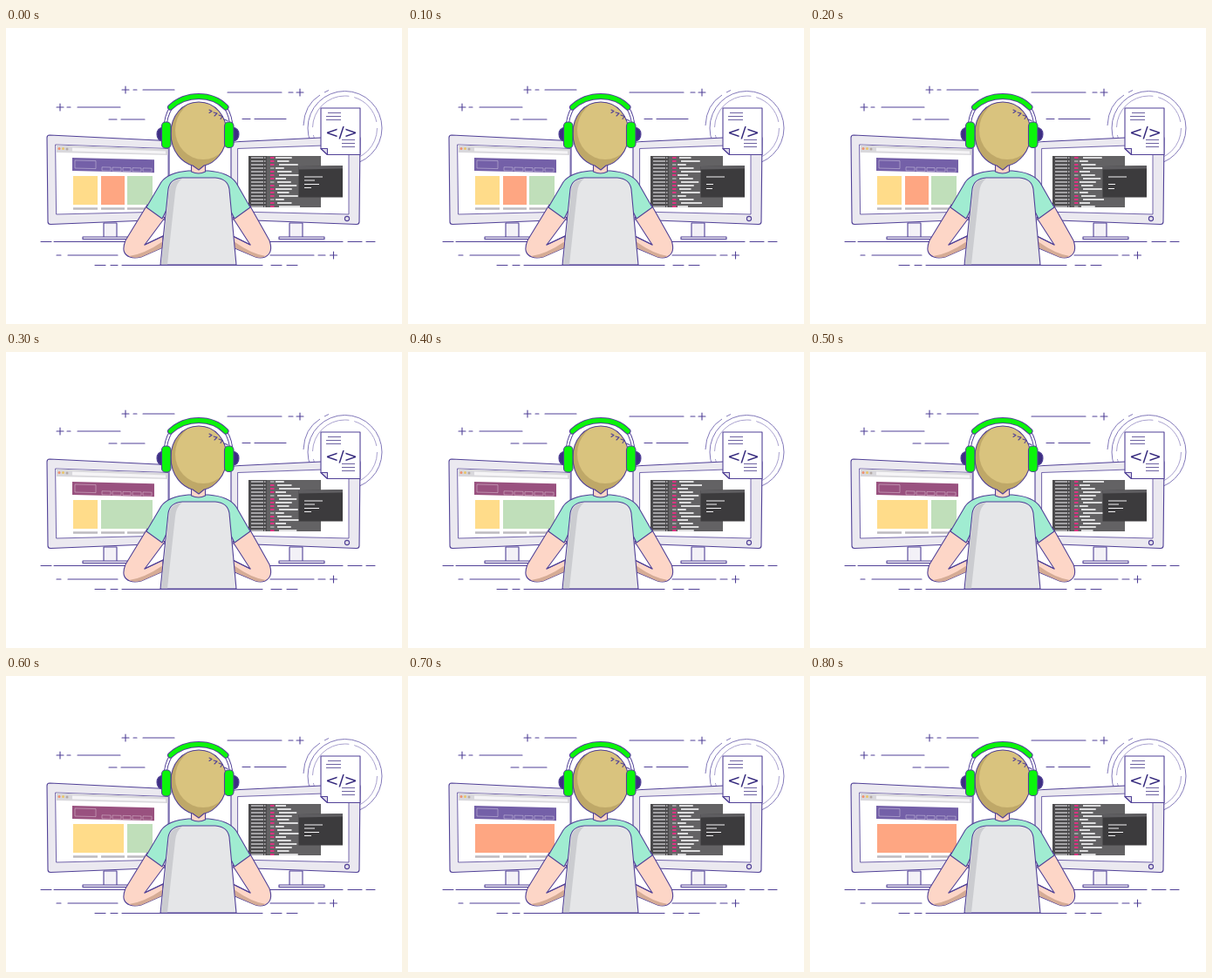
Write an HTML page that moves like this. It is 454 px wide and 340 px high and loops after 900 ms.

```html
<!DOCTYPE html>
<html lang="en">
<head>
<meta charset="utf-8">
<title>Developer at work</title>
<style>
html, body { margin: 0; width: 100%; height: 100%; overflow: hidden; background: #fff; }
svg { display: block; width: 100vw; height: 100vh; }
.ink { stroke: #514197; stroke-width: 1.1; stroke-linejoin: round; stroke-linecap: round; }
.line { fill: none; }
.bar { fill: #7460a8; animation: bar 900ms step-end infinite; }
.card { animation: 900ms step-end infinite; }
.yellow { fill: #ffdc8a; animation-name: yellow; }
.orange { fill: #fea682; animation-name: orange; }
.green { fill: #c0dfba; animation-name: green; }
.scroll { animation: scroll 900ms steps(9) infinite; }
.log { animation: log 900ms step-end infinite; }
.fresh { animation-name: fresh; }
@keyframes bar { 33.333% { fill: #99517f; } 77.778% { fill: #7460a8; } }
@keyframes yellow {
  0%, 33.333% { x: 77px; width: 28px; opacity: 1; }
  55.556% { width: 58px; opacity: 1; }
  77.778%, 100% { opacity: 0; }
}
@keyframes orange {
  0% { x: 109px; width: 27px; opacity: 1; }
  33.333% { opacity: 0; }
  77.778%, 100% { x: 77px; width: 91px; opacity: 1; }
}
@keyframes green {
  0% { x: 139px; width: 29px; opacity: 1; }
  33.333% { x: 109px; width: 59px; opacity: 1; }
  55.556% { x: 139px; width: 29px; opacity: 1; }
  77.778%, 100% { opacity: 0; }
}
@keyframes scroll { to { transform: translateY(-36px); } }
@keyframes log { 0%, 33.333%, 100% { opacity: 1; } 11.111% { opacity: 0; } }
@keyframes fresh { 0%, 33.333%, 100% { opacity: 0; } 11.111% { opacity: 1; } }
</style>
</head>
<body>
<svg viewBox="0 0 454 340" preserveAspectRatio="none">
  <defs>
    <clipPath id="editor"><path d="M278 147H361V206H278Z"/></clipPath>
    <path id="hair" d="M221 85C240 85 253 101 253 121C253 143 238 156 227 158L221 163L214 158C203 155 189 143 189 121C189 101 202 85 221 85Z"/>
    <clipPath id="head"><use href="#hair"/></clipPath>
    <path id="arc" d="M188.500 91Q202 78.500 221 78.500Q240 78.500 252 91"/>
    <path id="hoop" d="M183 109Q185 95 193 87M258 109Q256 95 248 87"/>
  </defs>
  <rect width="454" height="340" fill="#fff"/>

  <!-- background strokes -->
  <path class="ink line" d="M133 71h8M137 67v8M146 71h4M157 71h36
    M58 91h8M62 87v8M70 91h4M82 91h49M118 105h9M132 105h27
    M254 74h62M324 74h5M333 74h8M337 70v8M271 104.500h9M285 104.500h36
    M40 245.500h12M55 245.500h97M296 245.500h90M392 245.500h16M413 245.500h10
    M58 261h5M71 261h57M303 261h50M358 261h8M371.500 261h8M375.500 257v8
    M102 272.500h12M120 272.500h8M133 272.500h161M304 272.500h12M322 272.500h12"/>

  <!-- badge rings -->
  <g fill="none" stroke="#8379ba">
    <circle cx="388.500" cy="115" r="42.500"/>
    <circle cx="388.500" cy="115" r="37" stroke="#aaa2cf" stroke-dasharray="62 6 40 9"/>
    <path d="M341 112Q342 88 360 77M365 74L370 71.500"/>
  </g>

  <!-- left monitor -->
  <g class="ink">
    <path fill="#f3f1f7" d="M112 224h15v17h-15Z"/>
    <path fill="#f1eff4" d="M88 240h52v2.500H88Z"/>
    <path fill="#ebe9f0" d="M50 123L184 129.500Q187 130 187 133V220L51 225.500Q48 225.500 48 222.500L47 126Q47 123 50 123Z"/>
    <path fill="#fff" stroke-width=".8" d="M57 134L186 138.500V211L58 214Z"/>
  </g>
  <path fill="#d9d8dc" d="M58 134.500L185.500 139V146L58 143Z"/>
  <path fill="#f5f4f6" d="M76 137.500L183 141.500V144.500L76 141.500Z"/>
  <g fill="#ee9070"><circle cx="61" cy="138.500" r="1.500"/><circle cx="65.500" cy="138.500" r="1.500" fill="#e9c568"/><circle cx="70" cy="139" r="1.500" fill="#b4aaa8"/></g>
  <g transform="translate(0 -1.900) skewY(1.400)">
    <rect class="bar" x="76" y="149" width="94" height="15"/>
    <path fill="none" stroke="#fff" stroke-opacity=".42" stroke-width=".8" d="M79 152h24v9H79ZM110 159h10v4h-10ZM122 159h10v4h-10ZM134 159h9v4h-9ZM145 159h10v4h-10ZM157 159h10v4h-10Z"/>
  </g>
  <rect class="card yellow" x="77" y="170" width="28" height="33"/>
  <rect class="card orange" x="109" y="170" width="27" height="33"/>
  <rect class="card green" x="139" y="170" width="29" height="33"/>
  <path stroke="#bdbbc0" stroke-width="2.500" d="M77 207.500h28M109 207.500h27M139 207.500h27"/>

  <!-- right monitor -->
  <g class="ink">
    <path fill="#f3f1f7" d="M325 224h15v17h-15Z"/>
    <path fill="#f1eff4" d="M313 240h52v2.500h-52Z"/>
    <path fill="#ebe9f0" d="M268 130.500L403 124Q406 124 406 127L405 222.500Q405 225.500 402 225.500L258 220V133Q258 131 268 130.500Z"/>
    <path fill="#fff" stroke-width=".8" d="M266 138.500L393 134V214L266 211Z"/>
    <circle cx="391" cy="219" r="2.600" fill="#e4e1ea"/>
  </g>
  <path fill="#636264" d="M278 147h83v59h-83Z"/>
  <path fill="#4b4a4c" d="M278 147h21v59h-21Z"/>
  <g clip-path="url(#editor)"><g id="code" class="scroll"></g></g>
  <path fill="#3c3b3d" d="M335.500 159L386 158V194.500H335.500Z"/>
  <path fill="#5e5d60" d="M335.500 159L386 158V161.500L335.500 162.500Z"/>
  <g fill="none" stroke="#f4f3f5" stroke-width="1.200">
    <path class="log" d="M342 171h21M342 175h12M342 179.500h17M342 183.500h8"/>
    <path class="log fresh" d="M342 171h21M342 179.500h8M342 184.500h7"/>
  </g>

  <!-- document -->
  <g class="ink">
    <path fill="#fff" d="M361 92H406V145.500H368.500L361 138.500Z"/>
    <path fill="#e2deed" d="M361 138.500H368.500V145.500Z"/>
  </g>
  <path stroke="#6e63a2" d="M369 97.500h15M367 101.500h17M367 105.500h17M385 128.500h15M385 132.500h15M385 136.500h15"/>
  <text x="384.500" y="125.500" text-anchor="middle" font-size="18.500" font-family="DejaVu Sans, sans-serif" fill="#33277c">&lt;/&gt;</text>

  <!-- person -->
  <g class="ink">
    <path fill="#fdd6c7" d="M162 203L137 244Q131 259 142 263Q147 265 155 263L180 252V239L159 249L182 218Z"/>
    <path fill="#fdd6c7" d="M279 203L302 244Q307 258 297 263Q292 265 286 263L260 252V239L280 249L260 218Z"/>
    <path fill="#d5ab95" stroke="none" d="M141 262Q158 260 180 245V252L155 263Q147 265 141 262ZM298 262Q282 260 261 245V252L286 263Q292 265 298 262Z"/>
    <path class="line" d="M180 239L159 249M260 239L280 249"/>
    <path fill="#a0ecd1" d="M209 164Q186 166 178 177L161 206L179 219L188 201H253L262 219L280 206L264 178Q256 166 232 164Z"/>
    <path fill="#fdd6c7" d="M212.500 150V165Q221 169 228.500 165V150Z"/>
    <path fill="#e5e6e8" d="M177 272L186 185Q188 173 202 172H240Q254 173 256 185L264 272Z"/>
    <path fill="#cbccd0" stroke="none" d="M178 271.500L187 186Q189 174 202 173Q195 178 194 189L185 271.500Z"/>
  </g>
  <g clip-path="url(#head)">
    <path fill="#bfa868" d="M185 80H257V166H185Z"/>
    <ellipse cx="226" cy="117" rx="32" ry="34" fill="#d9c37e"/>
  </g>
  <use href="#hair" class="ink line"/>
  <path class="line ink" stroke-width=".8" d="M233 94l3 1.500l-3 2M238 97l4 1l-3 3M244 100l4 1.500l-2 3M250 105l4 1.500M256 106l3 1"/>

  <!-- headphones -->
  <g class="ink">
    <use href="#hoop" class="line" stroke-width="4"/>
    <use href="#hoop" class="line" style="stroke:#fff;stroke-width:2.200"/>
    <path fill="#3e2f82" d="M180 114Q173 115 173 122Q173 129 180 130.500ZM260 114Q267 115 267 122Q267 129 260 130.500Z"/>
    <use href="#arc" class="line" stroke-width="7"/>
    <use href="#arc" class="line" style="stroke:#0bf50b;stroke-width:5"/>
    <rect x="178.500" y="108" width="10.500" height="30" rx="4.500" fill="#0bf50b"/>
    <rect x="250.500" y="108" width="10.500" height="29.500" rx="4.500" fill="#0bf50b"/>
  </g>
</svg>
<script>
const rowHeight = 4;
const widths = [25, 18, 29, 13, 22, 32, 16, 21, 27];
const stroke = (x, y, width, color) =>
  `<path d="M${x} ${y}h${width}" stroke="${color}" stroke-width="1.7"/>`;

let rows = "";
for (let i = 0; i < 25; i++) {
  const y = 149 + i * rowHeight;
  const kind = i % widths.length;
  rows += stroke(281, y, 14, "#b5b4b7") + stroke(296, y, 1.5, "#c4c3c6");
  rows += stroke(303, y, 4.5, kind % 4 === 3 ? "#aaa9ac" : "#f02c88");
  rows += stroke(309 + kind % 3 * 2, y, widths[kind] * .75, "#f3f2f4");
}
document.getElementById("code").innerHTML = rows;
</script>
</body>
</html>
```
